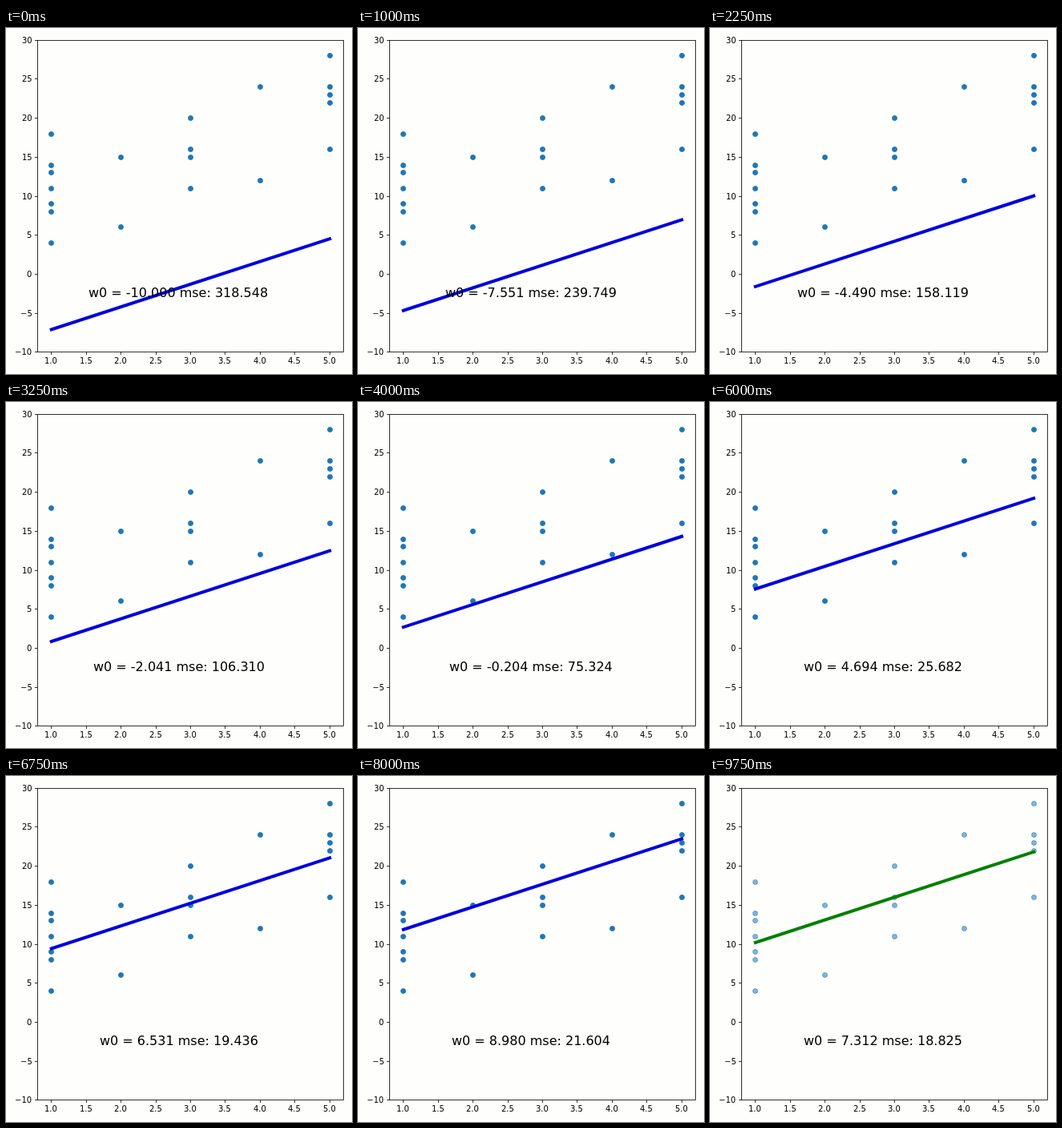
These frames come from a looping animation (432x432 px, 10 s). An HTML page with a canvas:

```html
<!DOCTYPE html>
<html lang="en">
<head>
<meta charset="utf-8">
<title>Least squares intercept</title>
<style>
html, body { margin: 0; width: 100%; height: 100%; overflow: hidden; background: #fefefd; }
canvas { display: block; }
</style>
</head>
<body>
<canvas id="stage" width="432" height="432"></canvas>
<script>
const ctx = document.getElementById('stage').getContext('2d');
const FRAME_MS = 250, FRAMES = 40, SWEEP = 35;
const SLOPE = 2.90625, BEST = 7.3125, STEP = 30 / 49;
const BOX = { left: 39.5, right: 421.5, top: 15.5, bottom: 404.5 };

// y values observed at each x
const samples = {
  1: [4, 8, 9, 11, 13, 14, 18],
  2: [6, 15],
  3: [11, 15, 16, 20],
  4: [12, 24],
  5: [16, 22, 23, 24, 28]
};
const points = Object.entries(samples).flatMap(([x, ys]) => ys.map(y => [+x, y]));

const px = x => 56.75 + (x - 1) * 86.85;
const py = y => 15.22 + (30 - y) * 9.74;
const snap = v => Math.floor(v) + 0.5;

// Evenly spaced intercepts with the optimum slotted into the sweep
const sweep = Array.from({ length: SWEEP - 1 }, (_, i) => -10 + i * STEP)
  .concat(BEST).sort((a, b) => a - b);

const mse = w => points.reduce((sum, [x, y]) => sum + (y - w - SLOPE * x) ** 2, 0) / points.length;
const format = v => (v - 1e-9).toFixed(3);

function segment(x1, y1, x2, y2) {
  ctx.beginPath();
  ctx.moveTo(x1, y1);
  ctx.lineTo(x2, y2);
  ctx.stroke();
}

// Text starts on a whole pixel; anchor is 0.5 for centred, 1 for right-aligned
function label(text, x, y, anchor, size) {
  ctx.font = `${size}px "DejaVu Sans", sans-serif`;
  ctx.fillStyle = '#000';
  ctx.fillText(text, Math.round(x - anchor * ctx.measureText(text).width), y);
}

function drawAxes() {
  ctx.strokeStyle = '#000';
  ctx.lineWidth = 0.8;
  ctx.lineCap = 'butt';
  ctx.strokeRect(BOX.left, BOX.top, BOX.right - BOX.left, BOX.bottom - BOX.top);
  for (let x = 1; x <= 5; x += 0.5) {
    const tx = snap(px(x));
    segment(tx, BOX.bottom, tx, BOX.bottom + 3.5);
    label(x.toFixed(1), px(x) - 0.5, 419, 0.5, 10);
  }
  for (let y = -10; y <= 30; y += 5) {
    const ty = snap(py(y));
    segment(BOX.left - 3.5, ty, BOX.left, ty);
    label(String(y).replace('-', '\u2212'), 32.5, ty + 3.5, 1, 10);
  }
}

function drawPoints(alpha) {
  ctx.globalAlpha = alpha;
  ctx.fillStyle = ctx.strokeStyle = '#1f77b4';
  ctx.lineWidth = 1;
  for (const [x, y] of points) {
    ctx.beginPath();
    ctx.arc(snap(px(x)), snap(py(y)), 3, 0, 2 * Math.PI);
    ctx.fill();
    ctx.stroke();
  }
  ctx.globalAlpha = 1;
}

function draw(index) {
  const done = index >= SWEEP;
  const w = done ? BEST : sweep[index];
  ctx.fillStyle = '#fefefd';
  ctx.fillRect(0, 0, 432, 432);
  drawPoints(done ? 0.55 : 1);
  ctx.strokeStyle = done ? '#008000' : '#0000dc';
  ctx.lineWidth = 4;
  ctx.lineCap = 'square';
  segment(px(1), py(w + SLOPE), px(5), py(w + SLOPE * 5));
  drawAxes();
  label(`w0 = ${format(w)} mse: ${format(mse(w))}`, 215.5, 336, 0.5, 16);
}

const start = performance.now();
function tick() {
  const elapsed = performance.now() - start;
  draw(Math.floor(elapsed / FRAME_MS) % FRAMES);
  requestAnimationFrame(tick);
}
tick();
</script>
</body>
</html>
```
